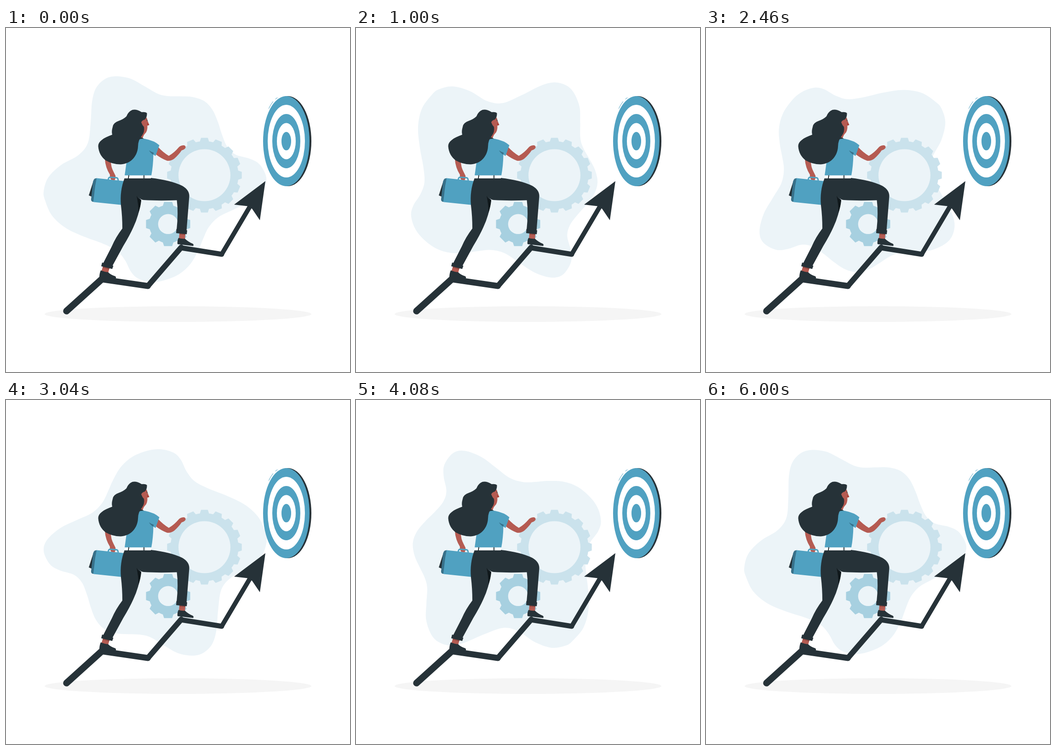
Write an HTML page with a canvas that moves like this. It is 748 px wide and 748 px high and loops after 6.04 s.

```html
<!DOCTYPE html>
<html lang="en">
<head>
<meta charset="utf-8">
<title>Climbing to the goal</title>
<style>
html, body { margin: 0; width: 100%; height: 100%; overflow: hidden; background: #fff; }
canvas { display: block; width: 100vmin; height: 100vmin; }
</style>
</head>
<body>
<canvas id="stage" width="748" height="748"></canvas>
<script>
const ctx = document.getElementById('stage').getContext('2d');
const LOOP = 6040;
const BLUE = '#50a1c1', DARK = '#263238', SKIN = '#b55b52', WHITE = '#fff';
const PIVOT = [324, 329.5];

const BLOB = [
  238,105, 270,110, 300,126, 330,143, 352,148, 378,148.5, 405,150, 431,159,
  449,178, 461,205, 469,230, 481,258, 499,275, 530,284, 552,297, 566,325,
  559,350, 531,376, 496,394, 462,411, 441,433, 429,458, 419,482, 402,512,
  377,535, 343,549, 315,552, 288,545, 272,530, 259,505, 241,484, 211,469,
  170,454, 130,435, 100,408, 85,375, 82,355, 92,325, 120,298, 157,277,
  178,250, 184,205, 187,160, 196,130, 215,111
];

// Closed smooth curve through a flat list of points.
function smooth(list) {
  const n = list.length / 2, path = new Path2D();
  const at = i => { const k = (i + n) % n * 2; return [list[k], list[k + 1]]; };
  path.moveTo(...at(0));
  for (let i = 0; i < n; i++) {
    const [a, b, c, d] = [at(i - 1), at(i), at(i + 1), at(i + 2)];
    path.bezierCurveTo(
      b[0] + (c[0] - a[0]) / 6, b[1] + (c[1] - a[1]) / 6,
      c[0] - (d[0] - b[0]) / 6, c[1] - (d[1] - b[1]) / 6, c[0], c[1]);
  }
  path.closePath();
  return path;
}

function gear(x, y, teeth, hole, root, tip, rootHalf, tipHalf) {
  const path = new Path2D(), step = 2 * Math.PI / teeth;
  for (let i = 0; i < teeth; i++) {
    const a = i * step - Math.PI / 2;
    path.lineTo(x + root * Math.cos(a - rootHalf), y + root * Math.sin(a - rootHalf));
    path.lineTo(x + tip * Math.cos(a - tipHalf), y + tip * Math.sin(a - tipHalf));
    path.lineTo(x + tip * Math.cos(a + tipHalf), y + tip * Math.sin(a + tipHalf));
    path.arc(x, y, root, a + rootHalf, a + step - rootHalf);
  }
  path.closePath();
  path.moveTo(x + hole, y);
  path.arc(x, y, hole, 0, 2 * Math.PI, true);
  path.closePath();
  return path;
}

function fill(color, shape) {
  ctx.fillStyle = color;
  ctx.fill(typeof shape === 'string' ? new Path2D(shape) : shape, 'evenodd');
}

function stroke(color, width, d) {
  ctx.strokeStyle = color;
  ctx.lineWidth = width;
  ctx.stroke(new Path2D(d));
}

function ellipse(color, x, y, rx, ry) {
  ctx.fillStyle = color;
  ctx.beginPath();
  ctx.ellipse(x, y, rx, ry, 0, 0, 2 * Math.PI);
  ctx.fill();
}

const blob = smooth(BLOB);
const bigGear = gear(431.5, 320, 16, 56.5, 74, 81.5, 0.135, 0.09);
const smallGear = gear(352.5, 426.3, 8, 21.8, 41.5, 48.8, 0.28, 0.18);

function drawTarget() {
  ellipse(DARK, 613, 246, 51, 98);
  ellipse(BLUE, 609.5, 246, 50.5, 98);
  ellipse(WHITE, 609.5, 246, 40.5, 79);
  ellipse(BLUE, 609.5, 246, 30.5, 59);
  ellipse(WHITE, 609.5, 246, 20.5, 39.5);
  ellipse(BLUE, 609.5, 246, 10.5, 20);
  stroke(BLUE, 1, 'M571.500 175Q575 167 580.500 160M586 154.500L590 151.500');
}

function drawArrow() {
  ctx.lineCap = ctx.lineJoin = 'round';
  stroke(DARK, 14.5, 'M131.500 615.500L209 545.500');
  stroke(DARK, 13, 'M209 546.500L308.500 561');
  stroke(DARK, 12, 'M308.500 561L381 477');
  stroke(DARK, 11, 'M381 478L469 492');
  stroke(DARK, 10, 'M469 492L530.500 388');
  fill(DARK, 'M564 333L496 384L526 387.500L535 393L552 418Z');
}

function drawBag() {
  fill(DARK, 'M190 333L180 364L187 367L196 334Z');
  fill('#38718a', 'M194 327Q190 329 189 336L185 373Q185 377 189 378L194 378L199 327Z');
  fill(BLUE, 'M197 326.500L258 333L254 385L191 378.500Q188 377 189 373L193 331Q194 327 197 326.500Z');
  fill('#38718a', 'M192 331Q193 327.500 197 326.500L194 343L190 377Q185 377 185.500 372Z');
}

function drawLegs() {
  // ankles and shoes
  fill(SKIN, 'M211 518L225 522L222 533L207 530Z');
  fill(SKIN, 'M377 446L390 447L389 460L376 459Z');
  fill('#914942', 'M211 518L225 522L224 525L210 521Z');
  fill('#914942', 'M377 446L390 447L390 450L377 449Z');
  fill(DARK, 'M206 527Q213 530 222 531Q228 537 238 540Q240 542 239 545L203 543Q203 534 206 527Z');
  fill(DARK, 'M375 456.500Q382 459 389 458Q396 465 406 469Q409 471 407 474L373 470Q372 463 375 456.500Z');
  // trousers
  fill(DARK, 'M258 326L315 326Q358 331 383 343Q399 352 398.500 366L392.500 441L371 439Q375 402 371.500 374.500Q330 376 299 374Q292 373 287 366L294 374Q289 408 277 433Q269 451 255 474L231 518L211 512L230 475Q239 454 253 436Q253 410 250 386Q247 354 258 326Z');
  fill('#10181b', 'M284 365Q288 373 294 374Q293 388 288 402Q288 382 284 365Z');
  fill(DARK, 'M209 510L233.500 517L231 524L207 518Z');
  fill(DARK, 'M370.500 437L394 440L393 448.500L370 446Z');
}

function drawBody() {
  // far arm and bag handle
  fill(SKIN, 'M215 285L228 289Q228 302 234 313L238 321Q239 327 236 331L229 330Q225 325 226 319Q216 303 215 285Z');
  stroke(BLUE, 3, 'M222 330L223 327Q224 324.500 227 324.500L240 325.500Q243 326 243.500 329L244 332');
  // near arm
  fill(SKIN, 'M331 259Q341 270 354 278Q366 271 376 259Q380 255 387 255Q391 256 390.500 260Q389 264 382 266Q376 275 366 284Q358 290 350 288.500Q338 284 326 275Z');
  // shirt
  fill(BLUE, 'M285 242Q293 239 302 241Q323 245 333.500 255L325 278.500L320.500 275Q320 300 316 321L258 321L262 292Z');
  fill('#38718a', 'M311 266Q316 270 321 271L320.500 275.500Q314 272 311 266Z');
  // belt
  fill(WHITE, 'M258 320.500L316 320.500L315 327L258 327Z');
  stroke(DARK, 2, 'M267 321L266 327M300 321L300 327');
}

function drawHead() {
  fill(SKIN, 'M296 194L306 195Q307.500 202 311.500 210.500Q310 212 307.500 212Q308 225 302 230Q299 233 297 240L288 242L290 204Z');
  fill(DARK, 'M288 239Q294 235 300 241Q294 240 288 243Z');
  fill(DARK, 'M306.500 185Q303 182 295 183Q280 174 271 180Q265 184 262 192Q256 198 245 202Q233 206 232 215Q229 225 231 232C211 239 200.500 247 200.500 257Q202 277 217 288Q233 297 250 296.500C272 295 286 278 287 258Q287 244 295 235Q302 226 300 215Q296 211 294 205Q297 200 302 199Q307 194 306.500 185Z');
  fill(SKIN, 'M302 203Q298 199 295.500 203Q295 209 301 211Z');
  fill('#a83b32', 'M307 206L311.500 210.500L307.500 212Z');
  stroke(DARK, 1, 'M306 199L307.500 202');
}

function draw(ms) {
  ctx.clearRect(0, 0, 748, 748);
  ctx.save();
  ctx.translate(...PIVOT);
  ctx.rotate(ms % LOOP / LOOP * 2 * Math.PI);
  ctx.translate(-PIVOT[0], -PIVOT[1]);
  fill('#ecf4f8', blob);
  ctx.restore();

  ellipse('#f5f5f5', 374, 622, 290, 17);
  fill('#cae2ec', bigGear);
  fill('#a7d0e0', smallGear);
  drawTarget();
  drawArrow();
  drawBag();
  drawLegs();
  drawBody();
  drawHead();
}

const start = performance.now();
function tick() {
  draw(performance.now() - start);
  requestAnimationFrame(tick);
}
tick();
</script>
</body>
</html>
```
